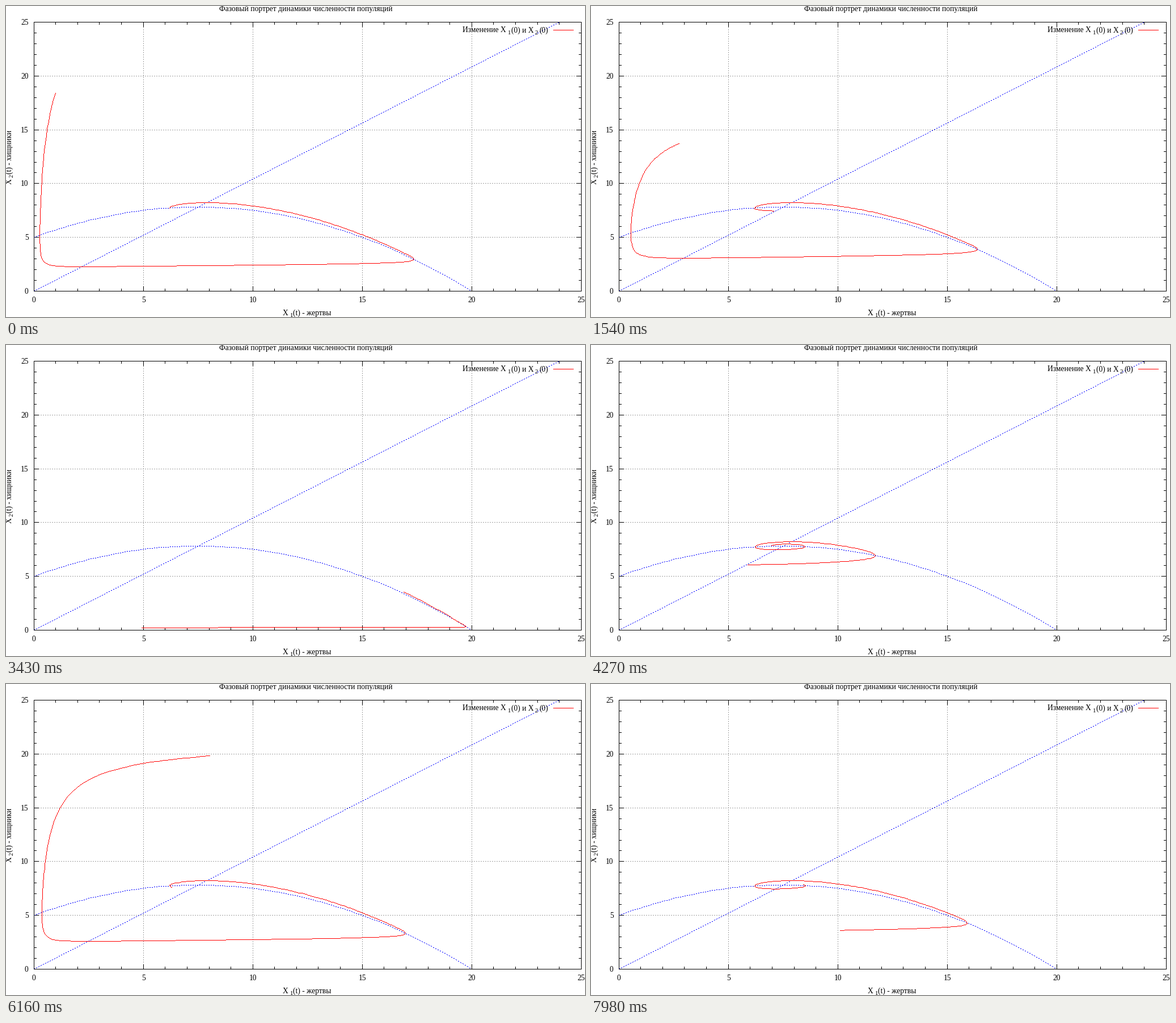
Animation, 1021 px wide and 548 px high, one loop 8000 ms. Source, as a matplotlib script:

```python
import numpy as np
import matplotlib.pyplot as plt
from matplotlib.animation import FuncAnimation

W, H, DPI = 1021, 548, 64
LOOP_MS, TICK_MS, STEP_MS = 8000, 20, 70
FONT_PX, SUB_PX = 13.5, 10.8
RED, BLUE, GRID = "#ff0000", "#0000ff", "#a0a0a0"
DOTS = (2, 2)
PX = 72 / DPI  # one pixel in points

plt.rcParams["font.family"] = "Liberation Serif"
plt.rcParams["path.simplify"] = False


# Data to pixel columns and rows
def sx(x):
    return 48.7 + 38.6 * np.asarray(x)


def sy(y):
    return 501.7 - 18.93 * np.asarray(y)


# Predator-prey model with a saturating response
def rates(s):
    x, y = s
    return np.array([x * (1 - x / 20 - y / (5 + x)),
                     0.04 * y * (1 - 0.96 * y / x)])


def solve(start, span=75.0, dt=0.05):
    """Runge-Kutta paths for all starting points at once."""
    path = [start]
    for _ in range(round(span / dt)):
        s = path[-1]
        a = rates(s)
        b = rates(s + dt / 2 * a)
        c = rates(s + dt / 2 * b)
        d = rates(s + dt * c)
        path.append(s + dt / 6 * (a + 2 * b + 2 * c + d))
    return np.array(path)


def thin(xs, ys, gap=4):
    """Keep points about gap pixels apart, and the last one."""
    run = np.append(0, np.cumsum(np.hypot(np.diff(xs), np.diff(ys))))
    keep = np.searchsorted(run, np.arange(0, run[-1], gap))
    keep = np.unique(np.append(keep, len(xs) - 1))
    return xs[keep], ys[keep]


def raster(xs, ys, dots=None):
    """Hard-edged one-pixel polyline, as one short dash per pixel."""
    x, y = np.rint(xs).astype(int), np.rint(ys).astype(int)
    dx, dy = np.diff(x), np.diff(y)
    n = np.maximum(abs(dx), abs(dy))
    seg = np.repeat(np.arange(len(n)), n)
    frac = (np.arange(len(seg)) - (np.cumsum(n) - n)[seg]) / n[seg]
    col = np.append(np.rint(x[seg] + dx[seg] * frac), x[-1])
    row = np.append(np.rint(y[seg] + dy[seg] * frac), y[-1])
    if dots:
        on = np.arange(len(col)) % sum(dots) < dots[0]
        col, row = col[on], row[on]
    gap = np.full(len(col), np.nan)
    return (np.column_stack([col, col + 1, gap]).ravel(),
            np.column_stack([row + 0.5, row + 0.5, gap]).ravel())


count = -(-LOOP_MS // STEP_MS)
x0 = 1 + 0.08 * np.arange(count)
paths = solve(np.array([x0, 10 + 10 * np.sin(x0)]))
orbits = [raster(*thin(sx(paths[:, 0, k]), sy(paths[:, 1, k])))
          for k in range(count)]

fig = plt.figure(figsize=(W / DPI, H / DPI), dpi=DPI, facecolor="white")
ax = fig.add_axes([0, 0, 1, 1])
ax.set_xlim(0, W)
ax.set_ylim(H, 0)
ax.axis("off")


def line(xs, ys, color="black", dots=None, z=2):
    return ax.plot(*raster(xs, ys, dots), color=color, lw=PX, snap=False,
                   solid_capstyle="butt", zorder=z)[0]


def label(x, y, text, size=FONT_PX, ha="left", rotation=0):
    ax.text(x, y, text, fontsize=size * PX, ha=ha, va="baseline",
            rotation=rotation, rotation_mode="anchor", zorder=5)


left, right = np.rint(sx([0, 25]))
bottom, top = np.rint(sy([0, 25]))

# Grid, ticks on all four sides, and numbers
for v in range(26):
    px, py = sx(v), sy(v)
    major = v % 5 == 0
    size = 8 if major else 4
    if major:
        if 0 < v < 25:
            line([px, px], [bottom, top], GRID, DOTS, 1)
            line([left, right], [py, py], GRID, DOTS, 1)
        label(px + 0.5, 521.5, str(v), ha="center")
        label(39.5, py + 5, str(v), ha="right")
    if 0 < v < 25:
        line([px, px], [bottom, bottom - size])
        line([px, px], [top, top + size])
        line([left, left + size], [py, py])
        line([right, right - size], [py, py])
line([left, right, right, left, left], [bottom, bottom, top, top, bottom], z=6)

# Nullclines
xs = np.linspace(0, 20, 80)
line(sx(xs), sy((1 - xs / 20) * (5 + xs)), BLUE, DOTS, 3)
line(sx([0, 24]), sy([0, 25]), BLUE, DOTS, 3)

label(529, 9, "Фазовый портрет динамики численности популяций", ha="center")

label(488, 545, "X")
label(500, 548, "1", SUB_PX)
label(506, 545, "(t) - жертвы")

label(9.5, 314, "X", rotation=90)
label(12.5, 302.5, "2", SUB_PX, rotation=90)
label(9.5, 296, "(t) - хищники", rotation=90)

label(805, 46.5, "Изменение X")
label(884, 50, "1", SUB_PX)
label(891, 46.5, "(0) и X")
label(932.5, 50, "2", SUB_PX)
label(940, 46.5, "(0)")
line([965, 1000], [42, 42], RED, z=4)

orbit = line([left, right], [bottom, bottom], RED, z=4)


def draw(i):
    k = (i * TICK_MS + TICK_MS // 2) // STEP_MS
    orbit.set_data(*orbits[k])
    return (orbit,)


anim = FuncAnimation(fig, draw, frames=LOOP_MS // TICK_MS, interval=TICK_MS,
                     repeat=True, repeat_delay=0, blit=False)
plt.show()
```
